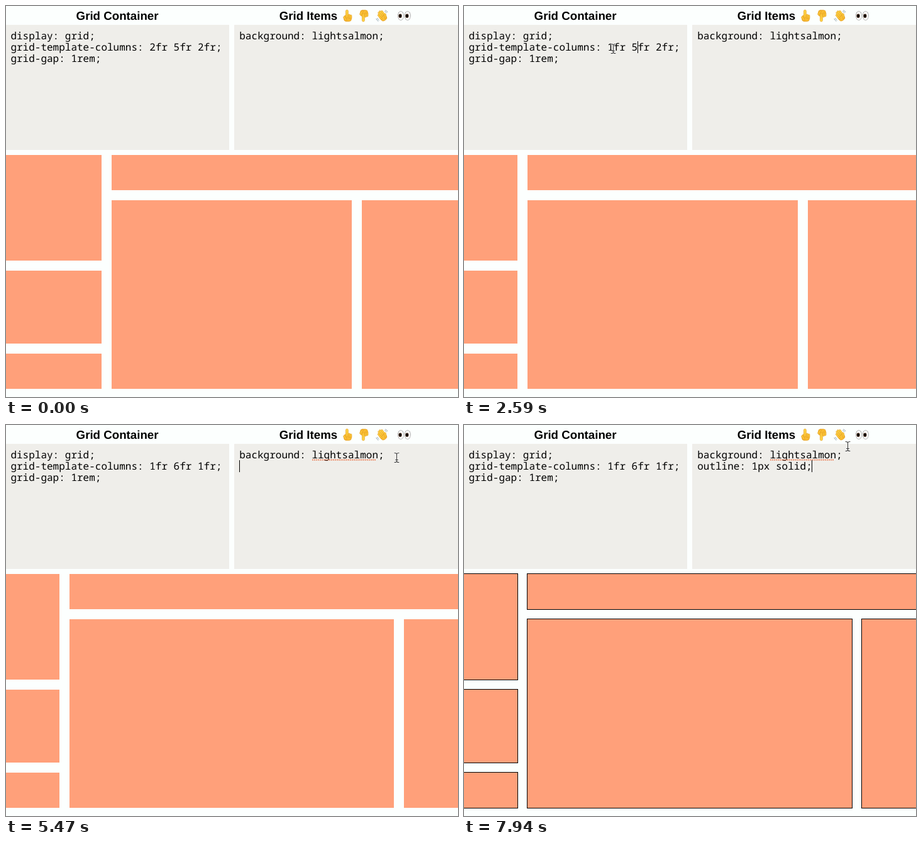
An HTML page with a canvas for the animation above (8 s loop, 719x622 px).

```html
<!DOCTYPE html>
<html lang="en">
<head>
<meta charset="utf-8">
<title>Grid playground</title>
<style>
  html, body { margin: 0; width: 100%; height: 100%; overflow: hidden; background: #fcfffe; }
  canvas { display: block; }
</style>
</head>
<body>
<canvas id="stage" width="719" height="622"></canvas>
<script>
const ctx = document.getElementById('stage').getContext('2d');
const LOOP = 8000, W = 719, H = 622;
const ADVANCE = 9.6, LEFT = 7.4, RIGHT = 371.2, LINE = 18;
const MONO = '16px "Noto Sans Mono", "DejaVu Sans Mono", monospace';
const BOLD = 'bold 18.72px "Liberation Sans", Arial, sans-serif';
const OUTLINE = 'outline: 1px solid;';

// [time, column fractions, caret index in the second line (0 = hidden)]
const edits = [
  [0, '2,5,2', 0], [1530, '2,5,2', 24], [1940, '2,5,2', 0],
  [2034, ',5,2', 23], [2128, '1,5,2', 24], [2222, '1,5,2', 25],
  [2316, '1,5,2', 26], [2410, '1,5,2', 27], [2590, '1,5,2', 28],
  [2940, '1,5,2', 0], [3290, '1,,2', 27], [3380, '1,6,2', 28],
  [3470, '1,6,2', 29], [3560, '1,6,2', 30], [3650, '1,6,2', 31],
  [3820, '1,6,2', 32], [4000, '1,6,', 31], [4060, '1,6,1', 32],
  [4410, '1,6,1', 0]
];

// Moment at which the i-th letter of the outline rule is typed
function keyTime(i) {
  if (i === 0) return 5760;
  if (i < 7) return 5820 + 60 * i;
  if (i < 10) return [6410, 6590, 6700][i - 7];
  return 6880 + (i - 10) * 88.75;
}

function rect(x, y, w, h, color) {
  ctx.fillStyle = color;
  ctx.fillRect(x, y, w, h);
}

function text(str, x, y, font) {
  ctx.font = font;
  ctx.fillStyle = '#000';
  ctx.fillText(str, x, y);
}

function pill(x, y, w, h, r = Math.min(w, h) / 2) {
  ctx.beginPath();
  ctx.roundRect(x, y, w, h, r);
  ctx.fill();
  ctx.stroke();
}

function oval(x, y, rx, ry, color) {
  ctx.beginPath();
  ctx.ellipse(x, y, rx, ry, 0, 0, Math.PI * 2);
  ctx.fillStyle = color;
  ctx.fill();
}

function skin() {
  const g = ctx.createLinearGradient(0, -10, 0, 10);
  g.addColorStop(0, '#ffd849');
  g.addColorStop(1, '#f7b52c');
  ctx.fillStyle = g;
  ctx.strokeStyle = '#e29a1f';
  ctx.lineWidth = 0.6;
}

function pointer(x, flip) {
  ctx.save();
  ctx.translate(x, 15.5);
  ctx.scale(1, flip);
  skin();
  pill(-5.5, -1, 12, 10, 4);
  pill(-2.6, -9.3, 4, 13);
  pill(1.4, -2.4, 3, 7);
  pill(4, -1.4, 3, 6.4);
  ctx.rotate(-0.5);
  pill(-7, -1.5, 3.2, 8);
  ctx.restore();
}

function wave(x) {
  ctx.save();
  ctx.translate(x, 16);
  ctx.strokeStyle = '#8fa3ad';
  ctx.lineWidth = 1;
  for (const r of [8.5, 10.5]) {
    ctx.beginPath();
    ctx.arc(0, 0, r, 2.2, 2.75);
    ctx.stroke();
    ctx.beginPath();
    ctx.arc(0, 0, r, -1.1, -0.6);
    ctx.stroke();
  }
  ctx.rotate(-0.65);
  skin();
  pill(-5, -3, 10, 11, 4);
  for (let i = 0; i < 4; i++) pill(-5.2 + i * 2.6, [-6, -8.6, -9.2, -7.6][i], 2.7, 10);
  ctx.rotate(0.55);
  pill(3.2, -3.5, 3, 8);
  ctx.restore();
}

function eye(x) {
  oval(x, 15.5, 4.9, 7.3, '#8d8d8d');
  oval(x, 15.5, 4.3, 6.8, '#fff');
  oval(x - 0.9, 15.7, 2.6, 3.2, '#4a2e1e');
  oval(x - 0.9, 15.7, 1.8, 2.3, '#0c0806');
}

function header() {
  text('Grid Container', 111.6, 22, BOLD);
  text('Grid Items', 434.7, 22, BOLD);
  pointer(543, 1);
  pointer(569, -1);
  wave(598.5);
  eye(628);
  eye(638.8);
}

function box(x1, y1, x2, y2, outlined) {
  if (outlined) rect(x1 - 1, y1 - 1, x2 - x1 + 2, y2 - y1 + 2, '#000');
  rect(x1, y1, x2 - x1, y2 - y1, '#ffa07a');
}

function grid(cols, placed, outlined) {
  // a fraction without its number voids the rule: equal columns
  const fr = cols.includes('') ? [1, 1, 1] : cols.map(Number);
  const unit = (W - 32) / (fr[0] + fr[1] + fr[2]);
  const a = Math.round(fr[0] * unit - 0.5), b = a + 16;
  const c = Math.round((fr[0] + fr[1]) * unit + 15.5), d = c + 16;
  const edge = W + 3;
  if (placed) {
    box(-3, 237, a, 405, outlined);
    box(-3, 421, a, 537, outlined);
    box(-3, 553, a, 609, outlined);
    box(b, 237, edge, 293, outlined);
    box(b, 309, c, 609, outlined);
    box(d, 309, edge, 609, outlined);
  } else {
    for (const y of [237, 309]) {
      box(-3, y, a, y + 56);
      box(b, y, c, y + 56);
      box(d, y, edge, y + 56);
    }
  }
}

function caret(origin, index, line) {
  rect(Math.floor(origin + index * ADVANCE), 38 + line * LINE, 1, 19, '#000');
}

function squiggle() {
  for (let x = 488; x < 590; x += 3) oval(x, 55.5, 1, 1, '#ee6a3c');
}

// Progress of a stepped move, 0..1
function progress(t, from, to, n) {
  const p = Math.min(1, Math.max(0, (t - from) / (to - from)));
  return Math.floor(p * n + 1e-6) / n;
}

function mousePos(t) {
  if (t < 760) return null;
  if (t < 4410) {
    const e = 1 - (1 - progress(t, 760, 1530, 12)) ** 3;
    return [2 + 235 * e, 87 - 19.5 * e];
  }
  if (t < 7880) {
    const p = progress(t, 4410, 5180, 13);
    const e = p * p * (3 - 2 * p);
    return [237 + 384.5 * e, 67.5 - 15.5 * e - 17 * Math.sin(Math.PI * e)];
  }
  return t < 7940 ? [617, 44] : [610.5, 33.5];
}

function beam([x, y]) {
  ctx.save();
  ctx.translate(Math.floor(x) + 0.5, Math.round(y));
  ctx.beginPath();
  for (const s of [-1, 1]) {
    ctx.moveTo(-3.5, s * 7.5);
    ctx.quadraticCurveTo(0, s * 7.5, 0, s * 5.5);
    ctx.quadraticCurveTo(0, s * 7.5, 3.5, s * 7.5);
  }
  ctx.moveTo(0, -6);
  ctx.lineTo(0, 6);
  ctx.moveTo(-2, 3.5);
  ctx.lineTo(2, 3.5);
  ctx.lineCap = 'round';
  ctx.strokeStyle = 'rgba(255,255,255,.6)';
  ctx.lineWidth = 2.4;
  ctx.stroke();
  ctx.strokeStyle = '#3c3c3c';
  ctx.lineWidth = 1.1;
  ctx.stroke();
  ctx.restore();
}

function draw(t) {
  const [, fractions, index] = edits.filter(e => e[0] <= t).pop();
  const cols = fractions.split(',');
  let n = 0;
  while (n < OUTLINE.length && keyTime(n) <= t) n++;
  const typed = OUTLINE.slice(0, n);

  rect(0, 0, W, H, '#fcfffe');
  rect(0, 30, 355, 199, '#efeeea');
  rect(363, 30, 356, 199, '#efeeea');
  header();
  grid(cols, n === 0 || n >= 10, typed.includes('solid'));

  const code = ['display: grid;', `grid-template-columns: ${cols.map(c => c + 'fr').join(' ')};`, 'grid-gap: 1rem;'];
  code.forEach((row, i) => text(row, LEFT, 53 + i * LINE, MONO));
  text('background: lightsalmon;', RIGHT, 53, MONO);
  text(typed, RIGHT, 53 + LINE, MONO);

  if (index) caret(LEFT, index, 1);
  if (t >= 5470) {
    squiggle();
    caret(RIGHT, n, 1);
  } else if (t >= 5180) {
    caret(RIGHT, 24, 0);
  }
  const mouse = mousePos(t);
  if (mouse) beam(mouse);
}

ctx.textRendering = 'geometricPrecision';
const start = performance.now();
function tick() {
  draw((performance.now() - start) % LOOP);
  requestAnimationFrame(tick);
}
tick();
</script>
</body>
</html>
```
